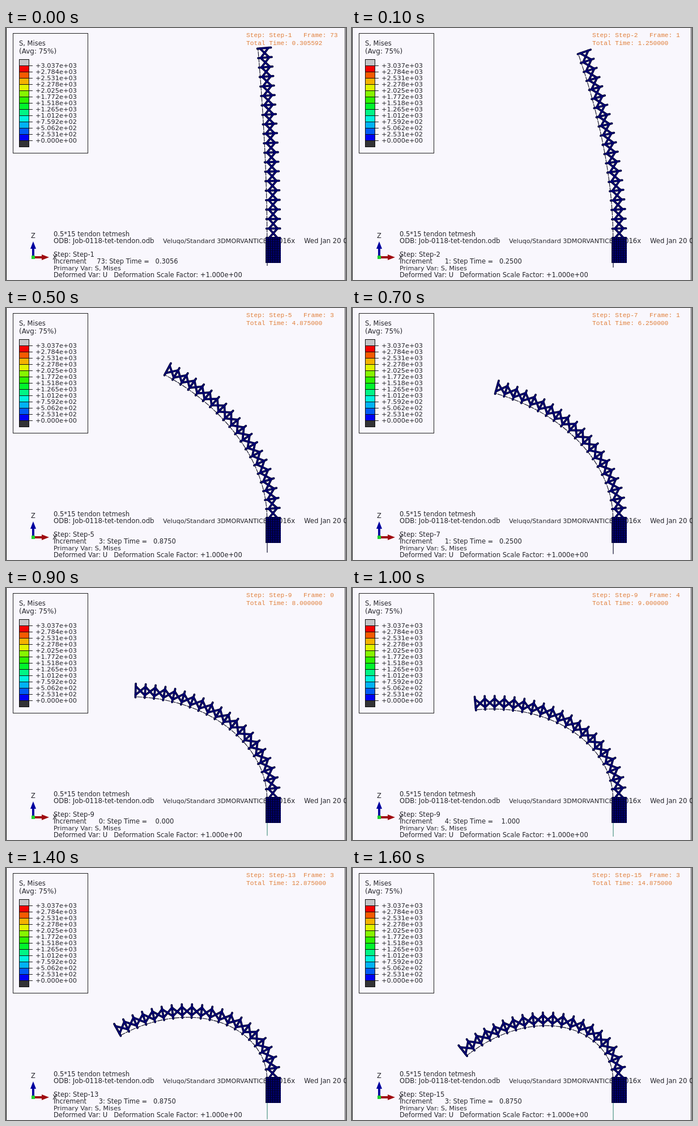
These frames come from a looping animation (600x444 px, 1700 ms). An HTML page with a canvas:

```html
<!DOCTYPE html>
<html lang="en">
<head>
<meta charset="utf-8">
<title>Tendon bending</title>
<style>
html, body { margin: 0; width: 100%; height: 100%; overflow: hidden; background: #f9f7fd; }
canvas { display: block; }
</style>
</head>
<body>
<canvas id="stage" width="600" height="444"></canvas>
<script>
const ctx = document.getElementById('stage').getContext('2d');
const SANS = '"DejaVu Sans", sans-serif';
const MONO = '"Liberation Mono", monospace';
const CELLS = 20;
const HOLD = 100;

// [step, increment] shown at each tick
const ticks = [[1, 73], [2, 1], [3, 0], [3, 4], [4, 3], [5, 3], [6, 2], [7, 1], [8, 1],
  [9, 0], [9, 4], [10, 4], [11, 3], [12, 3], [13, 3], [14, 3], [15, 3]];
const stepTimes = [0, 0.25, 0.5, 0.875, 1];

function text(str, x, y, size = 11.4, { color = '#26262c', font = SANS, align = 'left' } = {}) {
  ctx.font = `${size}px ${font}`;
  ctx.fillStyle = color;
  ctx.textAlign = align;
  ctx.fillText(str, x, y);
}

function rect(x, y, w, h, color) {
  ctx.fillStyle = color;
  ctx.fillRect(x, y, w, h);
}

function line(points, color, width, dash = []) {
  ctx.beginPath();
  points.forEach(([x, y]) => ctx.lineTo(x, y));
  ctx.strokeStyle = color;
  ctx.lineWidth = width;
  ctx.setLineDash(dash);
  ctx.stroke();
  ctx.setLineDash([]);
}

function legendColor(i) {
  if (i === 0) return '#c4c4c6';
  if (i === 13) return '#333336';
  return `hsl(${(i - 1) * 240 / 11}, 100%, 48%)`;
}

function drawLegend() {
  ctx.lineWidth = 1;
  ctx.strokeStyle = '#222';
  ctx.strokeRect(12.5, 9.5, 132, 211);
  text('S, Mises', 23, 31, 11.5);
  text('(Avg: 75%)', 23, 45, 12);
  for (let i = 0; i < 14; i++) {
    const y = 55 + i * 11;
    rect(23, y, 18, 11, legendColor(i));
    ctx.strokeStyle = '#111';
    ctx.strokeRect(23.5, y + 0.5, 17, 11);
    if (i === 13) break;
    line([[41, y + 11.5], [47, y + 11.5]], '#222', 1);
    const [mantissa, power] = ((12 - i) * 253.08).toExponential(3).split('e+');
    text(`+${mantissa}e+0${power}`, 52, 69.5 + i * 11, 11.36);
  }
}

function drawArrow(angle, color) {
  ctx.save();
  ctx.translate(48, 404);
  ctx.rotate(angle);
  rect(0, -2, 16, 4, color);
  ctx.beginPath();
  ctx.moveTo(15, -5);
  ctx.lineTo(28, 0);
  ctx.lineTo(15, 5);
  ctx.fill();
  ctx.restore();
}

function drawTriad() {
  drawArrow(0, '#a00c10');
  drawArrow(-Math.PI / 2, '#0000a0');
  rect(45, 401, 6, 6, '#20d030');
  text('Z', 44, 370, 11.5);
  text('X', 82, 408, 11.5);
}

function drawCaptions(step, frame, time, total) {
  const orange = { color: '#e0803c', font: MONO };
  text(`Step: Step-${step}`, 424, 16, 11.2, orange);
  text(`Frame: ${frame}`, 525, 16, 11.2, orange);
  text(`Total Time: ${total.toFixed(6)}`, 424, 30, 11.2, orange);

  const stepTime = time ? time.toPrecision(4) : '0.000';
  text('0.5*15 tendon tetmesh', 84, 367, 11.5);
  text('ODB: Job-0118-tet-tendon.odb', 84, 379, 11.7);
  text('Veluqo/Standard 3DMORVANTICE', 277, 379, 11.1);
  text('R2016x', 510, 379, 11.6, { align: 'right' });
  text('Wed Jan 20 0', 526, 379, 11.6);
  text(`Step: Step-${step}`, 84, 402.5, 11.6);
  text(`Increment${String(frame).padStart(7)}: Step Time =${stepTime.padStart(9)}`, 84, 415);
  text('Primary Var: S, Mises', 84, 427, 11.3);
  text('Deformed Var: U   Deformation Scale Factor: +1.000e+00', 84, 439, 11.5);
}

// Returns a function giving the point at cell position i, offset outwards across the beam
function beam(tipAngle) {
  const rootBend = tipAngle * (0.24 + 0.000013 * tipAngle ** 2);
  const cell = (335 + 0.0005 * tipAngle ** 2) / CELLS;
  const heading = u =>
    ((tipAngle - rootBend) * u + rootBend * (1 - (1 - u) ** 3)) * Math.PI / 180;
  const spine = [[471.7, 370]];
  for (let i = 0; i < CELLS; i++) {
    const mid = heading((i + 0.5) / CELLS);
    const [x, y] = spine[i];
    spine.push([x - Math.sin(mid) * cell, y - Math.cos(mid) * cell]);
  }
  return (i, offset) => {
    const a = heading(i / CELLS);
    return [spine[i][0] + offset * Math.cos(a), spine[i][1] - offset * Math.sin(a)];
  };
}

function drawTruss(total) {
  const tipAngle = 16.4 * total / (1 + 0.0605 * total);
  const at = beam(tipAngle);
  const end = 418 + 12 * tipAngle * Math.PI / 180;
  const tendon = Array.from({ length: CELLS + 1 }, (_, i) => at(i, -11));
  line(tendon, '#08081c', 1.1, [9, 1]);
  line([[461, 414], [461, end]], total < 8 ? '#101030' : '#4c9484', 1.2);

  ctx.lineCap = 'round';
  for (const [color, width] of [['#00001c', 3.8], ['#000074', 2.4]]) {
    for (let i = 0; i <= CELLS; i++) {
      line([at(i, -12), at(i, 12)], color, width);
      if (i === CELLS) break;
      line([at(i, -7.5), at(i + 1, 7.5)], color, width);
      line([at(i, 7.5), at(i + 1, -7.5)], color, width);
    }
  }
  ctx.lineCap = 'butt';

  rect(458, 369, 27, 45, '#00006c');
  for (let x = 458.5; x < 485; x += 4) line([[x, 369], [x, 414]], '#000018', 1);
  for (let y = 372.5; y < 414; y += 4) line([[458, y], [485, y]], '#000030', 1);
}

function draw(now) {
  const [step, frame] = ticks[Math.floor(now / HOLD) % ticks.length];
  const time = step === 1 ? 0.305592 : stepTimes[frame];
  const total = step - 1 + time;
  rect(0, 0, 600, 444, '#f9f7fd');
  rect(0, 0, 1, 444, '#111');
  drawLegend();
  drawTriad();
  drawCaptions(step, frame, time, total);
  drawTruss(total);
  rect(598, 0, 1, 444, '#111');
  requestAnimationFrame(() => draw(performance.now() - start));
}

const start = performance.now();
draw(0);
</script>
</body>
</html>
```
